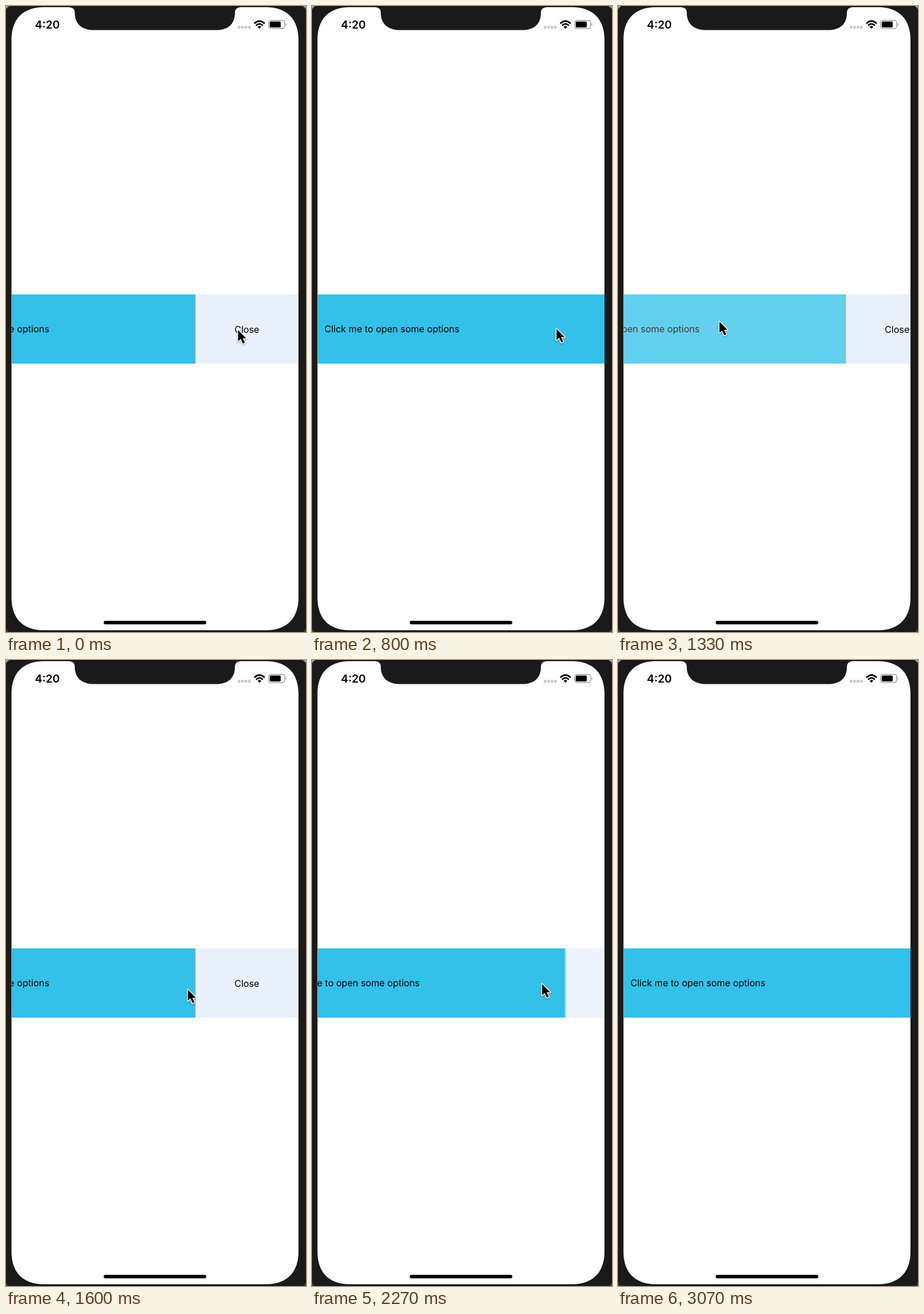
Animation of 519x1080 px, one loop 3.34 s. Source, as an HTML page:

```html
<!DOCTYPE html>
<html lang="en">
<head>
<meta charset="utf-8">
<title>Sliding options</title>
<style>
  html, body { margin: 0; width: 100%; height: 100%; overflow: hidden; background: #1a1a1a; }
  svg { display: block; width: 519px; height: 1080px; }
  text { font-family: Inter, "Liberation Sans", sans-serif; font-size: 16px; }
  .clock { font-size: 19px; font-weight: 600; }
</style>
</head>
<body>
<svg viewBox="0 0 519 1080">
  <defs>
    <clipPath id="screen"><rect x="9.5" y="2" width="496.5" height="1075" rx="56"/></clipPath>
    <filter id="shadow" x="-50%" y="-50%" width="200%" height="200%">
      <feDropShadow dx="0" dy="1.2" stdDeviation="1.2" flood-opacity=".4"/>
    </filter>
  </defs>

  <!-- desktop corners around the phone body -->
  <path d="M0 0H6Q2 2 0 6ZM519 0H513Q517 2 519 6Z" fill="#8ea6c9"/>
  <path d="M0 1080H6Q2 1078 0 1074ZM519 1080H513Q517 1078 519 1074Z" fill="#5b360e"/>

  <path fill="#fff" d="M65.5 2H108Q119 2 119 12C119 31 132 41.5 152 41.5H364C384 41.5 396 31 396 12Q396 2 407 2H450C487 2 506 24 506 58V1021C506 1055 487 1077 450 1077H65.5C28 1077 9.500 1055 9.500 1021V58C9.500 24 28 2 65.5 2Z"/>

  <text class="clock" x="50" y="39">4:20</text>
  <g fill="#c9c9cb">
    <rect x="401" y="34.300" width="4.600" height="4.600" rx="1"/>
    <rect x="406.900" y="34.300" width="4.600" height="4.600" rx="1"/>
    <rect x="412.800" y="34.300" width="4.600" height="4.600" rx="1"/>
    <rect x="418.700" y="34.300" width="4.600" height="4.600" rx="1"/>
  </g>
  <g fill="none" stroke="#000" stroke-width="2.700">
    <path d="M429.500 30.300Q438.500 21.700 447.500 30.300"/>
    <path d="M432.700 33.700Q438.500 28.200 444.300 33.700"/>
    <path d="M435.300 35.800Q438.500 33 441.700 35.800L438.500 39.200Z" fill="#000" stroke="none"/>
  </g>
  <rect x="454.400" y="24.900" width="27.800" height="14" rx="3.800" fill="none" stroke="#8c8c8c" stroke-width="1.200"/>
  <rect x="456.300" y="26.800" width="19" height="10.200" rx="1.800"/>
  <path d="M483.700 29.500Q486.300 31.900 483.700 34.300Z" fill="#8c8c8c"/>

  <g clip-path="url(#screen)">
    <g id="row">
      <g id="main">
        <rect x="9.500" y="497.500" width="496.500" height="119.500" fill="#33c0e9"/>
        <text x="21.500" y="563">Click me to open some options</text>
      </g>
      <g id="close">
        <rect x="506" y="497.500" width="180" height="119.500" fill="#e8f0fc"/>
        <rect x="506" y="497.500" width="2" height="119.500" fill="#a5a7a9"/>
        <text x="596.700" y="563.500" text-anchor="middle">Close</text>
      </g>
    </g>
  </g>

  <rect x="169" y="1060.800" width="177.500" height="6" rx="3"/>

  <g id="cursor" filter="url(#shadow)">
    <path d="M0 0V19.500L4.500 15.300L8.300 23.600L11.800 22L8 14.300H14Z"
      stroke="#fff" stroke-width="2.800" stroke-linejoin="round" paint-order="stroke"/>
  </g>
</svg>

<script>
const LOOP = 3340, TICK = 1000 / 15, OPEN_WIDTH = 180;
const [row, main, close, cursor] =
  ["row", "main", "close", "cursor"].map(id => document.getElementById(id));

// time, x, y of the pointer tip
const pointer = [
  [0, 401.5, 559], [133, 423, 557], [800, 423, 557],
  [867, 410, 556], [1000, 275, 549], [1067, 200, 545], [1133, 175.5, 544.5],
  [1333, 175.5, 544.5], [1400, 183, 547], [1600, 314.5, 568.5],
  [1733, 380, 563], [1867, 396, 559.5], [2000, 398, 559],
  [2400, 398, 559], [2467, 385, 542], [2800, 36, 91], [2867, -40, -40], [LOOP, -40, -40]
];

function pointerAt(t) {
  const i = Math.max(1, pointer.findIndex(p => p[0] >= t));
  const [t0, x0, y0] = pointer[i - 1], [t1, x1, y1] = pointer[i];
  const k = (t - t0) / (t1 - t0);
  return [x0 + (x1 - x0) * k, y0 + (y1 - y0) * k];
}

// critically damped spring, 0 to 1
function spring(t, start) {
  const s = Math.max(0, t - start) * 0.02;
  return s > 6.6 ? 1 : 1 - (1 + s) * Math.exp(-s);
}

// dims on press, then eases back after release
function touchOpacity(t, press, release) {
  if (t < press) return 1;
  const k = Math.min(1, Math.max(0, (t - release) / 250));
  const eased = k < 0.5 ? 2 * k * k : 1 - 2 * (1 - k) ** 2;
  return 0.2 + 0.8 * eased;
}

function draw(t) {
  const open = 1 - spring(t, 463) + spring(t, 1226) - spring(t, 2162);
  const [x, y] = pointerAt(t);
  row.setAttribute("transform", `translate(${-OPEN_WIDTH * open} 0)`);
  main.setAttribute("opacity", touchOpacity(t, 1180, 1180));
  close.setAttribute("opacity", t < 1500 ? touchOpacity(t, 325, 405) : touchOpacity(t, 2060, 2117));
  cursor.setAttribute("transform", `translate(${x} ${y})`);
}

const begin = performance.now();
function frame() {
  const t = (performance.now() - begin) % LOOP;
  draw(Math.floor((t + 4) / TICK) * TICK);
  requestAnimationFrame(frame);
}
draw(0);
requestAnimationFrame(frame);
</script>
</body>
</html>
```
